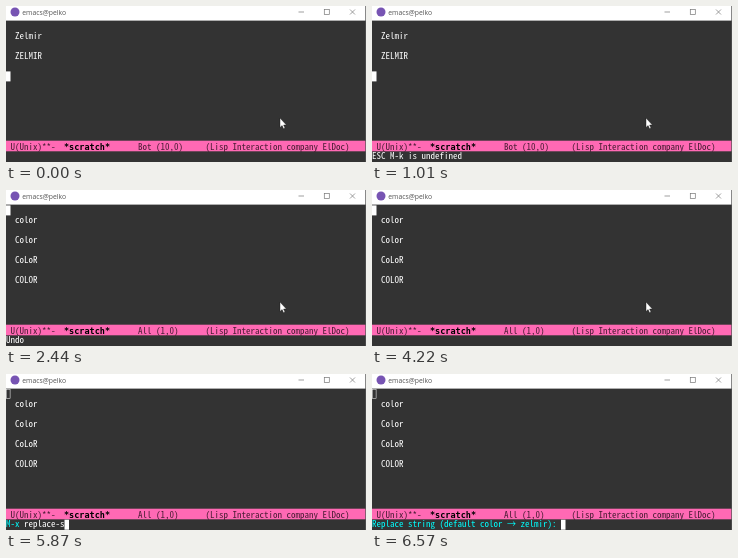
An HTML page with a canvas that plays this animation: 360 px wide and 156 px high, repeating every 8000 ms.

```html
<!DOCTYPE html>
<html lang="en">
<head>
<meta charset="utf-8">
<title>Editor session</title>
<style>
html, body { margin: 0; width: 100%; height: 100%; overflow: hidden; background: #333; }
canvas { display: block; width: 360px; height: 156px; }
</style>
</head>
<body>
<canvas id="stage"></canvas>
<script>
const W = 360, H = 156, LOOP = 8000;
const CELL = 4.5, ROW = 10, TOP = 15.4, MINI = 145.7;
const MONO = '9px "Noto Sans Mono CJK JP", "Noto Sans Mono CJK SC", "Noto Sans Mono", monospace';
const BOLD = 'bold 8.5px "DejaVu Sans Mono", monospace';
const TITLE = '6.8px "Open Sans", "Noto Sans", sans-serif';
const WHITE = '#fff', DARK = '#333', PINK = '#ff69b4', CYAN = '#00ffff';

const BEFORE = ['color', 'Color', 'CoLoR', 'COLOR'];
const AFTER = ['zelmir', 'Zelmir', 'Zelmir', 'ZELMIR'];
const COMMAND = 'replace-string';
const KEY_TIMES = [5000, 5090, 5180, 5300, 5390, 5540, 5630, 5720,
                   5870, 6020, 6080, 6140, 6200, 6350];

// Echo area messages, each lasting until the next entry.
const MESSAGES = [
  [0, ''], [190, 'ESC ESC M-k is undefined'], [620, ''],
  [920, 'ESC M-k is undefined'], [1540, ''], [2440, 'Undo'], [4220, '']
];
const T_TOP = 1540, T_UNDO = 2440, T_PROMPT = 4660, T_REPLACE = 6570;

const canvas = document.getElementById('stage');
const ctx = canvas.getContext('2d');
const dpr = window.devicePixelRatio || 1;
canvas.width = W * dpr;
canvas.height = H * dpr;
ctx.scale(dpr, dpr);

function rect(x, y, w, h, color) {
  ctx.fillStyle = color;
  ctx.fillRect(x, y, w, h);
}

function text(str, x, y, color = WHITE, font = MONO) {
  ctx.font = font;
  ctx.fillStyle = color;
  ctx.fillText(str, x, y);
}

function path(points, close) {
  ctx.beginPath();
  points.forEach(([x, y], i) => i ? ctx.lineTo(x, y) : ctx.moveTo(x, y));
  if (close) ctx.closePath();
}

function drawTitleBar() {
  rect(0, 0, W, 14.6, WHITE);
  ctx.fillStyle = '#7754b3';
  ctx.beginPath();
  ctx.arc(9, 6, 4.5, 0, Math.PI * 2);
  ctx.fill();
  text('emacs@pelko', 16.3, 8.5, '#555', TITLE);
  ctx.strokeStyle = '#777';
  ctx.lineWidth = 0.7;
  path([[292.5, 6], [298, 6]]);
  ctx.stroke();
  ctx.strokeRect(318.3, 3.5, 5, 5);
  path([[344, 3.5], [349, 8.5]]);
  ctx.stroke();
  path([[349, 3.5], [344, 8.5]]);
  ctx.stroke();
}

function drawBuffer(t) {
  const atTop = t >= T_TOP;
  const words = t >= T_UNDO ? BEFORE : atTop ? AFTER : AFTER.slice(2);
  words.forEach((word, i) => text(word, 2 * CELL, TOP + ROW * (1 + 2 * i) + 8));

  const y = TOP + (atTop ? 0 : 5 * ROW);
  if (t < T_PROMPT) {
    rect(0, y, CELL, ROW, WHITE);
  } else {
    ctx.strokeStyle = WHITE;
    ctx.lineWidth = 0.5;
    ctx.strokeRect(0.4, y + 0.2, CELL - 0.8, ROW - 0.9);
  }
}

function drawModeLine(t) {
  const base = 143.5, ink = '#4a1c34';
  rect(0, 134.7, W, 10.6, PINK);
  text('U(Unix)**-', CELL, base, ink);
  text('*scratch*', 58, base, '#000', BOLD);
  text(t < T_TOP ? 'Bot (10,0)' : 'All (1,0)', 132, base, ink);
  text('(Lisp Interaction company ElDoc)', 199.5, base, ink);
}

function drawMinibuffer(t) {
  const base = MINI + 7.6;
  if (t < T_PROMPT) {
    const [, message] = MESSAGES.filter(([start]) => t >= start).pop();
    text(message, 0, base);
    return;
  }
  let cursorX;
  if (t < T_REPLACE) {
    const typed = COMMAND.slice(0, KEY_TIMES.filter(k => t >= k).length);
    text('M-x', 0, base, CYAN);
    text(typed, 4 * CELL, base);
    cursorX = (4 + typed.length) * CELL;
  } else {
    text('Replace string (default color → zelmir):', 0, base, CYAN);
    cursorX = 42 * CELL;
  }
  rect(cursorX, MINI, CELL, ROW, WHITE);
}

function drawPointer() {
  ctx.save();
  ctx.translate(274, 112);
  path([[0, 0], [0, 9.5], [2.1, 7.6], [3.5, 10.8], [5, 10.1], [3.6, 7], [6.4, 7]], true);
  ctx.fillStyle = WHITE;
  ctx.fill();
  ctx.strokeStyle = '#111';
  ctx.lineWidth = 0.4;
  ctx.stroke();
  ctx.restore();
}

function draw(now) {
  const t = now % LOOP;
  rect(0, 0, W, H, DARK);
  drawTitleBar();
  drawBuffer(t);
  drawModeLine(t);
  drawMinibuffer(t);
  rect(W - 0.7, 0, 0.7, H, '#555');
  if (t < KEY_TIMES[0]) drawPointer();
}

let start = null;
function tick(now) {
  if (start === null) start = now;
  draw(now - start);
  requestAnimationFrame(tick);
}
draw(0);
requestAnimationFrame(tick);
</script>
</body>
</html>
```
